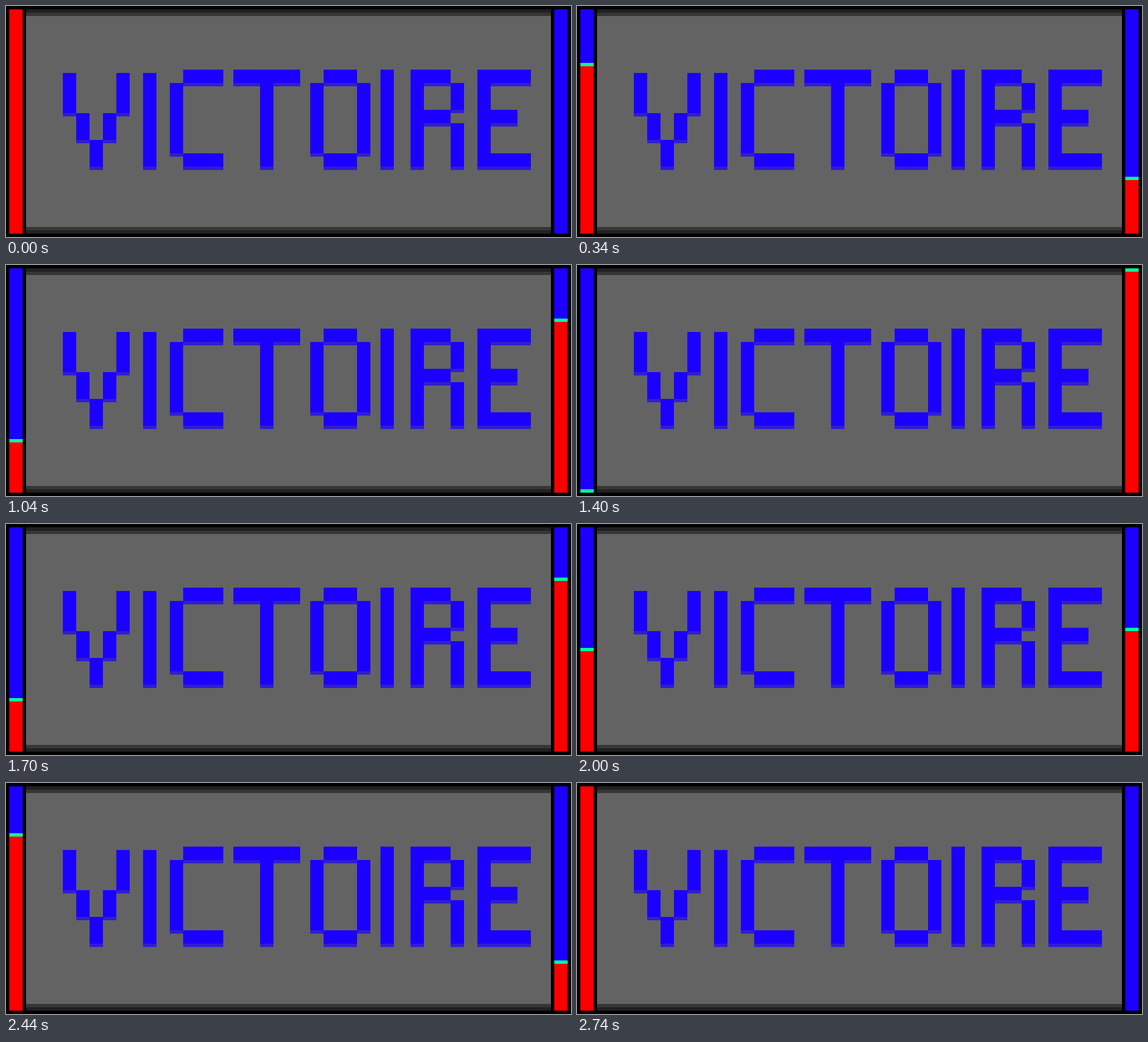
An HTML page with a canvas that plays this animation: 845x345 px, repeating every 2.76 s.

```html
<!DOCTYPE html>
<html lang="fr">
<head>
<meta charset="utf-8">
<title>Victoire</title>
<style>
html, body { margin: 0; width: 100%; height: 100%; overflow: hidden; background: #000; }
canvas { display: block; }
</style>
</head>
<body>
<canvas id="stage" width="845" height="345"></canvas>
<script>
const ctx = document.getElementById('stage').getContext('2d');
const CELL = 5, STEP = 20;
const COLS = 169, ROWS = 69, END = ROWS - 1;
const PEN = 4, TOP = 19, MID = 31, LOW = 44, BASE = 48;
const BLUE = '#1b00ff', RED = '#ff0000', GREEN = '#00ff99', SHADE = '#311ed0';

function box(color, x, y, w, h) {
  ctx.fillStyle = color;
  ctx.fillRect(x * CELL, y * CELL, w * CELL, h * CELL);
}

// The word is made of upright stems and level bars, measured in cells
const strokes = [];
const stem = (x, from = TOP, to = BASE) => strokes.push({ x, y: from, w: PEN, h: to - from });
const bar = (x, y, w) => strokes.push({ x, y, w, h: PEN });

const letters = {
  V(x) {
    for (let i = 0; i < 3; i++) {
      const from = TOP + 1 + (i && 4 + 8 * i);
      for (const side of [i, 4 - i]) stem(x + side * PEN, from, 32 + 8 * i);
    }
  },
  I(x, y = TOP) { stem(x, y); },
  C(x, w = 12) {
    stem(x, TOP + PEN, LOW);
    for (const y of [TOP, LOW]) bar(x + PEN, y, w);
  },
  T(x) {
    bar(x, TOP, 5 * PEN);
    stem(x + 2 * PEN);
  },
  O(x) {
    letters.C(x, 10);
    stem(x + 14, TOP + PEN, LOW);
  },
  R(x) {
    stem(x);
    for (const y of [TOP, MID]) bar(x + PEN, y, 8);
    stem(x + 12, TOP + PEN, MID);
    stem(x + 12, MID + PEN);
  },
  E(x) {
    stem(x);
    bar(x + PEN, TOP, 12);
    bar(x + PEN, MID, 8);
    bar(x + PEN, LOW, 12);
  }
};

function drawPanel() {
  box('#000', 0, 0, COLS, ROWS);
  ['#212121', '#363636', '#636363'].forEach((color, i) =>
    box(color, 6, 1 + i, 157, ROWS - 2 - 2 * i));

  letters.V(17);
  letters.I(41, TOP + 1);
  letters.C(49);
  letters.T(68);
  letters.O(91);
  letters.I(112);
  letters.R(121);
  letters.E(141);

  for (const s of strokes) box(SHADE, s.x, s.y + s.h, s.w, 1);
  for (const s of strokes) box(BLUE, s.x, s.y, s.w, s.h);
}

// Blue above the marker, red below; the frame edge hides the marker at both ends
function drawBar(x, mark) {
  box(BLUE, x, 0, PEN, mark);
  box(GREEN, x, mark, PEN, 1);
  box(RED, x, mark + 1, PEN, END - mark);
  for (const y of [0, END]) box('#000', x, y, PEN, 1);
}

function frame() {
  const last = 2 * END + 1;
  const k = Math.floor(performance.now() / STEP) % (last + 1);
  const mark = Math.min(k, last - k);
  drawBar(1, mark);
  drawBar(COLS - 1 - PEN, END - mark);
  requestAnimationFrame(frame);
}

drawPanel();
frame();
</script>
</body>
</html>
```
